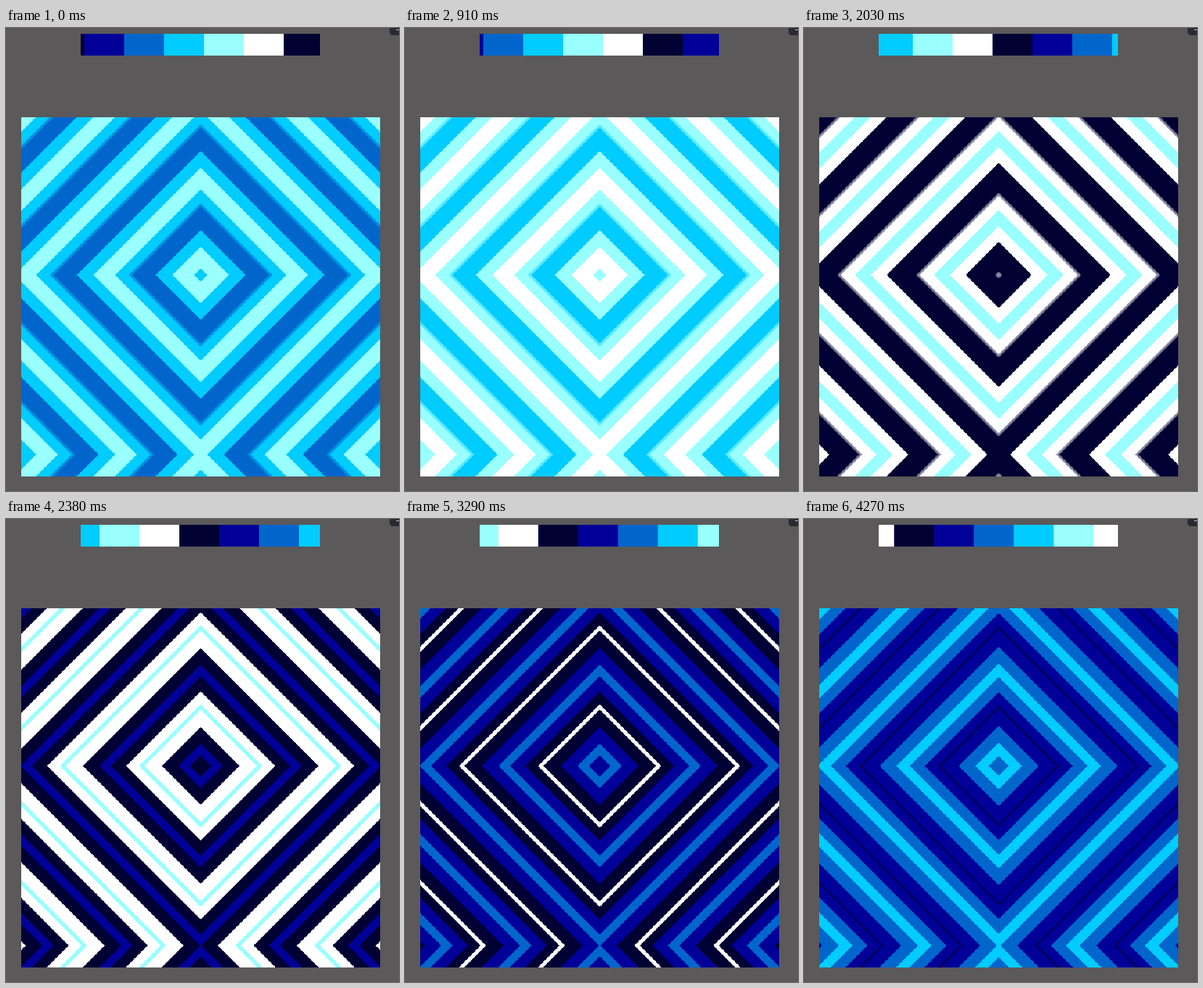
An HTML page with a canvas that plays this animation: 542x638 px, repeating every 4340 ms.

```html
<!DOCTYPE html>
<html lang="en">
<head>
<meta charset="utf-8">
<title>Palette cycling diamonds</title>
<style>
  html, body { margin: 0; width: 100%; height: 100%; overflow: hidden; background: #5b595a; }
  canvas { display: block; filter: blur(0.45px); }
</style>
</head>
<body>
<canvas id="stage" width="542" height="638"></canvas>
<script>
const ctx = document.getElementById('stage').getContext('2d');

const STEP_MS = 70, STEPS = 62, SPEED = 0.0771; // palette slots per step
const COLORS = [[0, 0, 153], [0, 102, 204], [0, 204, 255], [153, 255, 255], [255, 255, 255], [0, 0, 51]];
const RES = 1000, LEN = COLORS.length * RES, SOFT = 0.006;

const SIZE = 495, CELL = 4.95, CX = 247.5, CY = 217.3;
const BAR = { x: 103, y: 8, w: 330, h: 30, slot: 55, start: 108 };

// Palette position for each ring of cells, one full wave
const WAVE = [2.762, 2.766, 3.05, 3.38, 3.5, 3.56, 3.42, 3.17, 2.97, 2.81, 2.57,
              2.33, 2.1, 1.89, 1.68, 1.54, 1.296, 1.298, 1.75, 1.998, 2, 2.5];

const mod = (a, n) => ((a % n) + n) % n;

function colorAt(u) {
  const edge = Math.round(u);
  const k = Math.min(1, Math.max(0, (u - edge + SOFT) / (2 * SOFT)));
  const a = COLORS[mod(edge - 1, COLORS.length)];
  const b = COLORS[mod(edge, COLORS.length)];
  return a.map((v, i) => Math.round(v + (b[i] - v) * k));
}

const palette = new Uint32Array(LEN);
for (let i = 0; i < LEN; i++) {
  const [r, g, b] = colorAt(i / RES);
  palette[i] = (255 << 24 | b << 16 | g << 8 | r) >>> 0;
}

function waveAt(n) {
  const i = Math.floor(n), f = n - i;
  const a = WAVE[mod(i, WAVE.length)], b = WAVE[mod(i + 1, WAVE.length)];
  return a + (b - a) * f;
}

// Diamond distance on a wrapping square, with slightly beaded edges
function ringAt(x, y) {
  const dx = Math.abs(x + 0.5 - CX);
  let dy = Math.abs(y + 0.5 - CY);
  dy = Math.min(dy, SIZE - dy);
  const bead = 0.5 * Math.cos(2 * Math.PI * dx / CELL);
  return Math.max(0, dx + dy + bead) / CELL;
}

function makeLayer(w, h, valueAt) {
  const image = ctx.createImageData(w, h);
  const pixels = new Uint32Array(image.data.buffer);
  const slots = new Uint16Array(w * h);
  for (let y = 0; y < h; y++)
    for (let x = 0; x < w; x++)
      slots[y * w + x] = mod(Math.round(valueAt(x, y) * RES), LEN);
  return (shift, left, top) => {
    for (let i = 0; i < slots.length; i++) pixels[i] = palette[(slots[i] + shift) % LEN];
    ctx.putImageData(image, left, top);
  };
}

const drawPattern = makeLayer(SIZE, SIZE, (x, y) => waveAt(ringAt(x, y)));
const drawBar = makeLayer(BAR.w, BAR.h, x => (x + 0.5 + BAR.x - BAR.start) / BAR.slot);

function drawBackdrop() {
  ctx.fillStyle = '#5b595a';
  ctx.fillRect(0, 0, 542, 638);
  ctx.fillStyle = '#292a33';
  ctx.beginPath();
  ctx.moveTo(529, 0);
  ctx.lineTo(529, 5);
  ctx.quadraticCurveTo(529, 10, 534, 10);
  ctx.lineTo(542, 10);
  ctx.lineTo(542, 0);
  ctx.fill();
  ctx.fillStyle = '#c8c8cc';
  ctx.fillRect(538, 2, 4, 1);
}

let shown = -1;
const begin = performance.now();
function tick() {
  const step = Math.floor((performance.now() - begin) / STEP_MS) % STEPS;
  if (step !== shown) {
    shown = step;
    const shift = Math.round(step * SPEED * RES);
    drawBar(shift, BAR.x, BAR.y);
    drawPattern(shift, 21, 123);
  }
  requestAnimationFrame(tick);
}

drawBackdrop();
tick();
</script>
</body>
</html>
```
